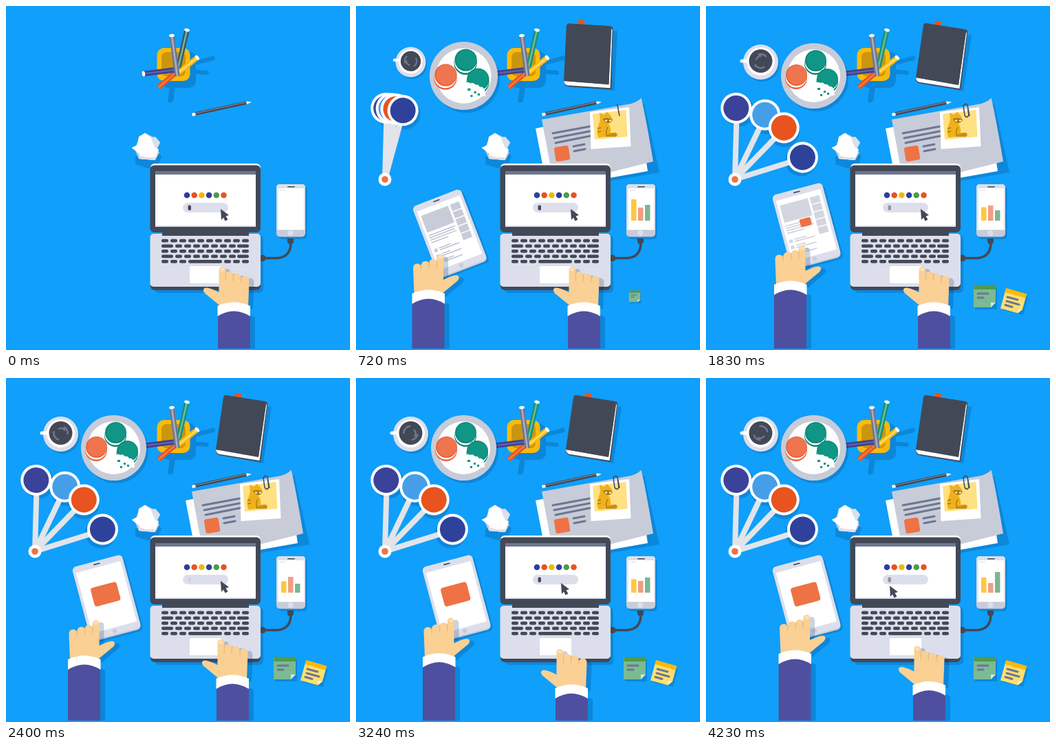
Write an HTML page that moves like this. It is 500x500 px and loops after 4260 ms.

```html
<!DOCTYPE html>
<html lang="en">
<head>
<meta charset="utf-8">
<title>Desk</title>
<style>
html, body { margin: 0; width: 100%; height: 100%; overflow: hidden; background: #109ffa; }
svg { display: block; width: 100%; height: 100%; }
.s { fill: #00285a; opacity: .2; }
.d { fill: #434856; }
.w { fill: #fff; }
.l { fill: #dcdfeb; }
.g { fill: #c8ccd8; }
.o { fill: #ee7244; }
.ln { fill: none; stroke: #6d7790; stroke-width: 3; stroke-linecap: round; }
</style>
</head>
<body>
<svg viewBox="0 0 500 500">
<defs>
  <path id="skin" d="M309.5 385Q309.5 379 314 379Q319 379 319.3 385V390Q320 386 325 386Q330 386 330.3 392Q332 388 337 389Q341.500 390 342 396Q344 392 348 392.500Q353.500 393 353.500 399L352 437H311L309 434L289 417.500Q285 412.500 288.500 410Q293 407.500 309.500 416Z"/>
  <path id="sleeve" d="M308 449Q331 436 355 449V600H308Z"/>
  <g id="hand">
    <use href="#skin" fill="#fad094"/>
    <path d="M319.300 388V399M330.300 390V400M342 394V402" fill="none" stroke="#e3b377" stroke-width="1"/>
    <rect x="311" y="380.500" width="6" height="5" rx="2.500" fill="#fde0b4"/>
    <use href="#sleeve" fill="#4e509f"/>
    <path class="w" d="M307.500 436Q331 425 355 436V451Q331 436 307.500 451Z"/>
  </g>
  <g id="handShade" class="s"><use href="#skin"/><use href="#sleeve"/></g>
</defs>
<rect width="500" height="500" fill="#109ffa"/>

<g id="book">
  <path class="s" d="M322 31L386 42L374 124L312 113Z"/>
  <path d="M332 28L333 21L342 23L341 30Z" fill="#e8531f"/>
  <path class="d" d="M319 25L377 34Q381 35 380 39L370 122L309 112Q304 110 306 103Z"/>
  <path class="w" d="M305.500 104L367 115L378 37L379 40L368.500 120L309 110.500Q305 108 305.500 104Z"/>
  <path class="d" d="M320 25L375 34Q379 35 378 38L367 114.500L305 104L316 28Q317 24.500 320 25Z"/>
</g>

<g class="s">
  <rect x="226" y="66" width="50" height="53" rx="10"/>
  <path d="M274 80L302 72Q306 76 302 79L274 86ZM268 92L293 94Q297 97 293 100L268 98ZM238 118L246 117L243 138Q238 143 235 138Z"/>
</g>
<rect x="219.500" y="61" width="48" height="48" rx="10" fill="#fbb90a"/>
<rect x="226" y="67" width="35" height="35" rx="7" fill="#c9960e"/>
<g id="pencils" fill="none" stroke-width="7.500"></g>

<g id="plate">
  <circle class="s" cx="160" cy="106" r="47"/>
  <circle class="g" cx="156.500" cy="101.500" r="47.500"/>
  <circle class="w" cx="156.500" cy="101.500" r="38.500"/>
  <g id="cakes"></g>
  <path class="w" d="M158 113Q162 109 166 112Q170 110 173 114Q177 113 179 117Q184 116 186 122L187 130H160Z"/>
  <path d="M162 119h4v3h-4zM171 123h3v3h-3zM166 128h3v3h-3zM176 126h3v3h-3z" fill="#0e9580"/>
</g>

<g id="coffee">
  <circle class="s" cx="82" cy="85" r="25"/>
  <circle class="l" cx="79.500" cy="81.500" r="25.500"/>
  <g id="mug">
    <path d="M52 80L66 80" stroke="#fff" stroke-width="5" stroke-linecap="round"/>
    <circle class="w" cx="79.500" cy="80.500" r="20.500"/>
    <circle class="d" cx="79.500" cy="80" r="17"/>
    <path id="swirl" d="M69.500 82A10 10 0 0 0 79 90M78 70A10 10 0 0 1 89.500 79M75 86A7 7 0 0 0 85 84" fill="none" stroke="#6d7790" stroke-width="2.500"/>
  </g>
</g>

<g id="papers">
  <path class="s" d="M280 172L419 142L441 242L290 268Z"/>
  <path class="w" d="M261 178L410 148L424 240L278 266Z"/>
  <path class="g" d="M270 165L400 142Q410 139 414.500 133.500Q420 155 432 226L288 262Z"/>
  <path class="ln" d="M286 185L340 175M288 192L340 182M290 199L340 189M316 204L332 201M317 211L333 208"/>
  <rect class="o" x="289" y="204" width="21" height="21" rx="3" transform="rotate(-9 299 214)"/>
</g>
<g id="photo">
  <path class="w" d="M340 154L397 147L399.500 204L341.500 208Z"/>
  <path d="M344 157L392.500 151L394.500 190L347 194Z" fill="#ffe082"/>
  <path d="M355 165L354 155L360 158L365 154L369 158Q374 163 371 168L367 171Q371 177 370 184H377Q381 185 379 189L352 191Q349 180 353 172Z" fill="#efb11b"/>
  <path d="M351 178L356 177M351 183L356 182M366 176Q362 183 365 190" fill="none" stroke="#a87a12" stroke-width="1.500"/>
  <path d="M364 187L377 184Q382 186 378 190H365Z" fill="#c98d15"/>
  <path d="M359 164Q366 161 373 165Q371 170 366 170Q361 169 359 164Z" fill="#a87a12"/>
  <path class="w" d="M362 165.500h3v2h-3zM368 165.500h3v2h-3z"/>
</g>
<path id="clip" d="M383 160L380 144Q377 140 374 145L376 159Q379 164 382 159L380.500 149" pathLength="1" fill="none" stroke="#434856" stroke-width="1.500" stroke-dasharray="1 1"/>

<path d="M274 157L350 140.500" stroke="#434856" stroke-width="4.500"/>
<path d="M276 156L349 139.800" stroke="#8c93a5" stroke-width="1"/>
<path class="w" d="M270 156L275 155L276 159L271 160ZM349 138.500L357 139.500L350 143Z"/>
<path class="s" d="M188 219L220 210L226 219L220 234L206 236L188 230Z"/>
<path class="g" d="M194 190L203 185L213 190L224 199L219 209L223 213L217 224L193 222L187 208Z"/>
<path class="w" d="M182.500 206L191 202L193 190L202 184.500L211 191L214 200L222 209L216 224L193 222L194 215Z"/>
<path class="l" d="M211 191L217 190L224 198L218 208L214 200ZM193 217L204 220L217 220L216 224L193 222Z"/>

<g id="fan"></g>

<rect class="s" x="216" y="333" width="158" height="84" rx="6"/>
<rect class="w" x="210" y="229" width="160" height="20" rx="6"/>
<rect class="d" x="209.500" y="231.500" width="160.500" height="97.500" rx="6"/>
<rect x="217" y="240" width="146" height="5" fill="#6d7790"/>
<rect class="w" x="217" y="245" width="146" height="76"/>
<rect class="l" x="217" y="319" width="146" height="2"/>
<rect class="d" x="210" y="380" width="160" height="33" rx="6"/>
<rect class="l" x="209.500" y="331" width="160.500" height="77" rx="5"/>
<rect class="d" x="227" y="328" width="126" height="6"/>
<g id="keys" class="d"></g>
<rect class="w" x="267" y="378" width="46" height="25" rx="1.500"/>
<g id="dots"></g>
<rect class="l" x="257" y="286" width="66" height="14" rx="7"/>
<rect id="caret" class="d" x="264.500" y="289.500" width="4.500" height="7.500" rx="2"/>
<path id="cursor" class="d" d="M312 295L324 304L319.500 305.500L322.500 310.500L318.500 312.500L316 307.500L313 311Z"/>

<path d="M374 366.500H394Q414 365 414 344" fill="none" stroke="#434856" stroke-width="3.500"/>
<path class="d" d="M370 362h5l2 2v5l-2 2h-5zM409 338h9v5l-2 3h-5l-2-3z"/>
<rect class="s" x="396" y="262" width="41.500" height="77" rx="5"/>
<rect class="g" x="393" y="259" width="42" height="76.500" rx="5"/>
<path class="l" d="M393 326V264Q393 259 398 259H430Q435 259 435 264V326Z"/>
<rect class="w" x="395.500" y="265" width="37.500" height="60"/>
<rect class="d" x="409" y="262" width="11" height="1.600" rx=".8"/>
<path class="g" d="M398 267h2v1h-2zM401 267h2v1h-2zM404 267h2v1h-2z"/>
<circle class="l" cx="413.500" cy="330" r="4"/>
<g id="bars"></g>

<g id="green">
  <path class="s" d="M391 409H423V441H391Z"/>
  <path d="M389 406H421V431L414 438H389Z" fill="#7cba94"/>
  <path d="M389.500 405.500H421.500V412H389.500Z" fill="#4d9b4e"/>
  <path d="M414 438V431H421Z" fill="#d5ead8"/>
  <path class="ln" d="M395 418H410M395 424H403"/>
</g>
<g id="yellow">
  <path class="s" d="M438 414L468 423L461 449L431 442Z"/>
  <path d="M436 410.500L466 419L460 441L453 446.500L428 439.500Z" fill="#ffdf70"/>
  <path d="M436.500 410L466 418.500L464.500 424.500L434.500 416Z" fill="#fbb90a"/>
  <path d="M453 446.500L454 440L460 441Z" fill="#fff3c9"/>
  <path id="notes" class="ln" pathLength="1" d="M438 423L453 427M437 429L455 434M435 434.500L445 437.500"/>
</g>

<g id="tablet">
  <rect class="s" x="-36" y="-51" width="76" height="111" rx="6"/>
  <rect class="g" x="-37.500" y="-54" width="75" height="111" rx="6"/>
  <rect class="l" x="-37.500" y="-55" width="75" height="110" rx="6"/>
  <rect class="w" x="-33.500" y="-46" width="67" height="91"/>
  <rect class="d" x="-6" y="-51.500" width="10" height="1.600" rx=".8"/>
  <circle class="g" cx="-1" cy="50" r="3.200"/>
  <g id="page">
    <path class="g" d="M-30-38h42v26h-42zM-30 14h5v5h-5zM-30 23h5v5h-5zM-30 32h5v5h-5z"/>
    <path d="M-30-7H11M-30-3.500H9M-30 0H11M-30 4H-4M-22 15H-4M-22 18H8M-22 24H-8M-22 27H8M-22 33H-6M-22 36H6" stroke="#b4b9c8" stroke-width="1.300"/>
    <g id="thumbs" class="g"></g>
  </g>
  <rect id="button" class="o" x="-19.500" y="-14" width="39" height="28" rx="4"/>
</g>

<g id="leftShade"><use href="#handShade" transform="translate(464.500 -29) scale(-1 1)"/></g>
<g id="left"><use href="#hand" transform="translate(457.500 -32) scale(-1 1)"/></g>
<g id="rightShade"><use href="#handShade" transform="translate(7 3)"/></g>
<g id="right"><use href="#hand"/></g>
<rect y="498" width="500" height="2" fill="#109ffa"/>
</svg>
<script>
const LOOP = 4260;
const $ = id => document.getElementById(id);
const set = (id, name, value) => $(id).setAttribute(name, value);
const move = (id, value) => set(id, 'transform', value);
const add = (id, markup) => $(id).insertAdjacentHTML('beforeend', markup);

// Pencils: tip x, y, end x, y, colour, highlight
[[222, 118, 248, 96, '#e8531f', '#f47b3f'],
 [263, 35, 249, 96, '#0e9580', '#7ab690'],
 [278, 75, 248, 99, '#fbb90a', '#ffdc74'],
 [200, 98.5, 248, 92.5, '#3f4188', '#5c5fb5'],
 [241, 43, 249, 102, '#6d7790', '#a9afc0']].forEach(([x, y, u, v, color, light], i) => {
  const line = `M${x} ${y}L${u} ${v}`;
  add('pencils', `<path class="pencil" d="${line}" stroke="${color}"/><path d="${line}" stroke="${light}" stroke-width="2.500"/>`);
  if (i) {
    const a = Math.atan2(v - y, u - x) * 180 / Math.PI;
    add('pencils', `<ellipse class="w" rx="2.200" ry="4" transform="translate(${x} ${y}) rotate(${a})"/>`);
  }
});

[[159, 81, '#0c8575', '#0f9684'], [131, 102, '#e8633a', '#f0754f'], [176, 108, '#0c8575', '#0f9684']]
  .forEach(([x, y, base, top]) => add('cakes',
    `<circle cx="${x}" cy="${y + 3}" r="16" fill="${base}"/><circle class="w" cx="${x}" cy="${y + 1}" r="15.500"/>
     <circle cx="${x + .5}" cy="${y - 1.5}" r="15.500" fill="${base}"/><circle cx="${x + 1}" cy="${y - 2}" r="14" fill="${top}"/>`));

const key = (x, y, w = 10) => add('keys', `<rect x="${x}" y="${y}" width="${w}" height="4.800" rx="2.200"/>`);
[338.700, 346.500, 354, 361.500, 369].forEach((y, row) => {
  if (row % 2) {
    key(226, y, 17);
    for (let i = 0; i < 7; i++) key(246 + 13 * i, y);
    key(336, y, 17);
  } else {
    for (let i = 0; i < 10; i++) if (row < 4 || i < 3 || i > 6) key(226 + 13 * i, y);
  }
});
key(265, 369, 49);

['#2e3f9b', '#e8531f', '#f7b500', '#2e3f9b', '#4f9b4a', '#e8531f'].forEach((c, i) =>
  add('dots', `<circle cx="${263 + 10.7 * i}" cy="275" r="4.300" fill="${c}"/>`));
for (let i = 0; i < 5; i++) add('thumbs', `<rect x="15" y="${-38 + 11.3 * i}" width="14" height="9.800"/>`);
['#fdc741', '#f19e7f', '#7bb793'].forEach((c, i) =>
  add('bars', `<rect x="${400 + 10 * i}" width="7.500" fill="${c}"/>`));

// Shadows lie under all the sticks
const badges = [[1, '#3a4299'], [25, '#459fe8'], [43.5, '#e8531f'], [72, '#2f429b']];
badges.forEach(() => add('fan', '<g class="badge"><circle class="s" cx="46" cy="152.500" r="22.500"/></g>'));
badges.forEach(([, color]) => add('fan', `<g class="badge">
  <path d="M38 252L39 150H47L46 252Z" fill="#e2e4ea"/>
  <circle class="w" cx="42" cy="148.500" r="22.500"/><circle cx="42" cy="148.500" r="18.500" fill="${color}"/></g>`));
add('fan', '<circle class="w" cx="42" cy="252" r="9.500"/><circle class="o" cx="42" cy="252" r="4.800"/>');

const bars = $('bars').children;
const sticks = document.querySelectorAll('.badge');
const tallPencil = document.querySelectorAll('.pencil')[1];

// Overshooting ease from 0 to 1
function back(t, start, length) {
  const q = Math.min(1, Math.max(0, (t - start) / length)) - 1;
  return q <= -1 ? 0 : 1 + 2.7 * q ** 3 + 1.7 * q ** 2;
}
const ramp = (t, a, b) => Math.min(1, Math.max(0, (t - a) / (b - a)));

// Smooth curve through [time, value] pairs, level at turning points
function curve(t, keys) {
  const n = keys.length - 1;
  if (t <= keys[0][0]) return keys[0][1];
  if (t >= keys[n][0]) return keys[n][1];
  const i = keys.findIndex(k => k[0] > t) - 1;
  const slope = j => (keys[j + 1][1] - keys[j][1]) / (keys[j + 1][0] - keys[j][0]);
  const tangent = j => {
    if (j < 1 || j >= n) return 0;
    const a = slope(j - 1), b = slope(j);
    return a * b > 0 ? 2 * a * b / (a + b) : 0;
  };
  const h = keys[i + 1][0] - keys[i][0], p = (t - keys[i][0]) / h;
  return keys[i][1] + (keys[i + 1][1] - keys[i][1]) * p * p * (3 - 2 * p)
    + h * p * (1 - p) * (tangent(i) * (1 - p) - tangent(i + 1) * p);
}
const paths = {
  tabletX: [[300, -50], [570, -23], [720, -10], [1140, 0]],
  tabletY: [[300, 220], [570, 45], [720, 11], [1140, 0]],
  tabletR: [[300, -20], [570, -11], [720, -6], [1140, 0]],
  leftX: [[300, -52], [570, -34], [720, -21], [1140, 0], [1830, -3.5], [2400, -12.5], [3240, -5.5], [4230, 3]],
  leftY: [[300, 220], [570, 45], [720, 14], [1140, 0], [1830, 1], [2400, 5], [3240, 1.5], [4230, -3]],
  rightX: [[2250, 0], [2400, -2], [3240, -18], [4230, -7]],
  rightY: [[2250, 0], [2400, 1], [3240, 15], [4230, 10.5]],
  cursorX: [[2400, 0], [3240, -14], [4230, -45]],
  cursorY: [[2400, 0], [3240, 3], [4230, 7]],
  caret: [[720, 1], [1140, .5], [1830, .5], [2400, .08], [3240, 1], [4230, .5]],
  bookX: [[300, -20], [720, -5], [1140, 0]],
  bookR: [[300, -40], [720, -5.5], [1140, 1], [1400, 0]],
  mugR: [[530, 90], [720, 4], [1140, -10], [1500, 0]],
  spread: [[690, 0], [720, .2], [1050, 1]],
  swing: [[720, 0], [1140, 3.8], [1500, 0]],
  bar0: [[420, 0], [720, 31], [1140, 28], [1830, 19.5], [2400, 16.5], [3240, 19.5], [4230, 22]],
  bar1: [[480, 0], [720, 19], [1140, 18], [1830, 22], [2400, 23], [3240, 17], [4230, 14]],
  bar2: [[540, 0], [720, 23], [1140, 21], [1830, 15], [2400, 13], [3240, 22], [4230, 30]]
};

const pop = (id, x, y, scale, turn = 0, dx = 0) =>
  move(id, `translate(${x + dx} ${y}) rotate(${turn}) scale(${scale}) translate(${-x} ${-y})`);

function draw(t) {
  const at = name => curve(t, paths[name]);
  const shift = name => `translate(${at(name + 'X')} ${at(name + 'Y')})`;

  tallPencil.setAttribute('stroke', t < 60 ? '#3b566e' : '#0e9580');
  pop('book', 342, 70, back(t, 300, 520), at('bookR'), at('bookX'));
  pop('plate', 156.5, 101.5, back(t, 300, 520));
  pop('coffee', 79.5, 81.5, back(t, 530, 700));
  pop('mug', 79.5, 80.5, 1, at('mugR'));
  pop('swirl', 79.5, 80, 1, t / LOOP * 360);
  pop('papers', 345, 205, back(t, 150, 420));
  pop('photo', 370, 178, back(t, 330, 380));
  set('clip', 'stroke-dashoffset', 1 - ramp(t, 640, 900));
  set('clip', 'visibility', t > 640 ? 'visible' : 'hidden');

  pop('fan', 42, 252, back(t, 600, 120));
  sticks.forEach((stick, i) => {
    const n = i % badges.length, angle = badges[n][0];
    stick.setAttribute('transform', `rotate(${n ? angle * at('spread') + at('swing') : angle} 42 252)`);
  });

  set('caret', 'opacity', at('caret'));
  move('cursor', shift('cursor'));
  for (let i = 0; i < 3; i++) {
    const h = at('bar' + i);
    bars[i].setAttribute('y', 312 - h);
    bars[i].setAttribute('height', h);
  }
  pop('green', 405, 422, back(t, 655, 500));
  pop('yellow', 447, 429, back(t, 1005, 500));
  const written = ramp(t, 1140, 1500);
  set('notes', 'stroke-dasharray', `${written} 1`);
  set('notes', 'visibility', written ? 'visible' : 'hidden');

  move('tablet', `translate(${146 + at('tabletX')} ${319 + at('tabletY')}) rotate(${at('tabletR') - 15})`);
  set('page', 'opacity', 1 - ramp(t, 1750, 2150));
  move('button', `translate(0 -5) scale(${back(t, 1790, 400)})`);
  for (const side of ['left', 'right']) {
    move(side, shift(side));
    move(side + 'Shade', shift(side));
  }
  const entered = t >= 300 ? 'visible' : 'hidden';
  for (const id of ['tablet', 'left', 'leftShade']) set(id, 'visibility', entered);
}

const start = performance.now();
function tick() {
  draw((performance.now() - start) % LOOP);
  requestAnimationFrame(tick);
}
tick();
</script>
</body>
</html>
```
